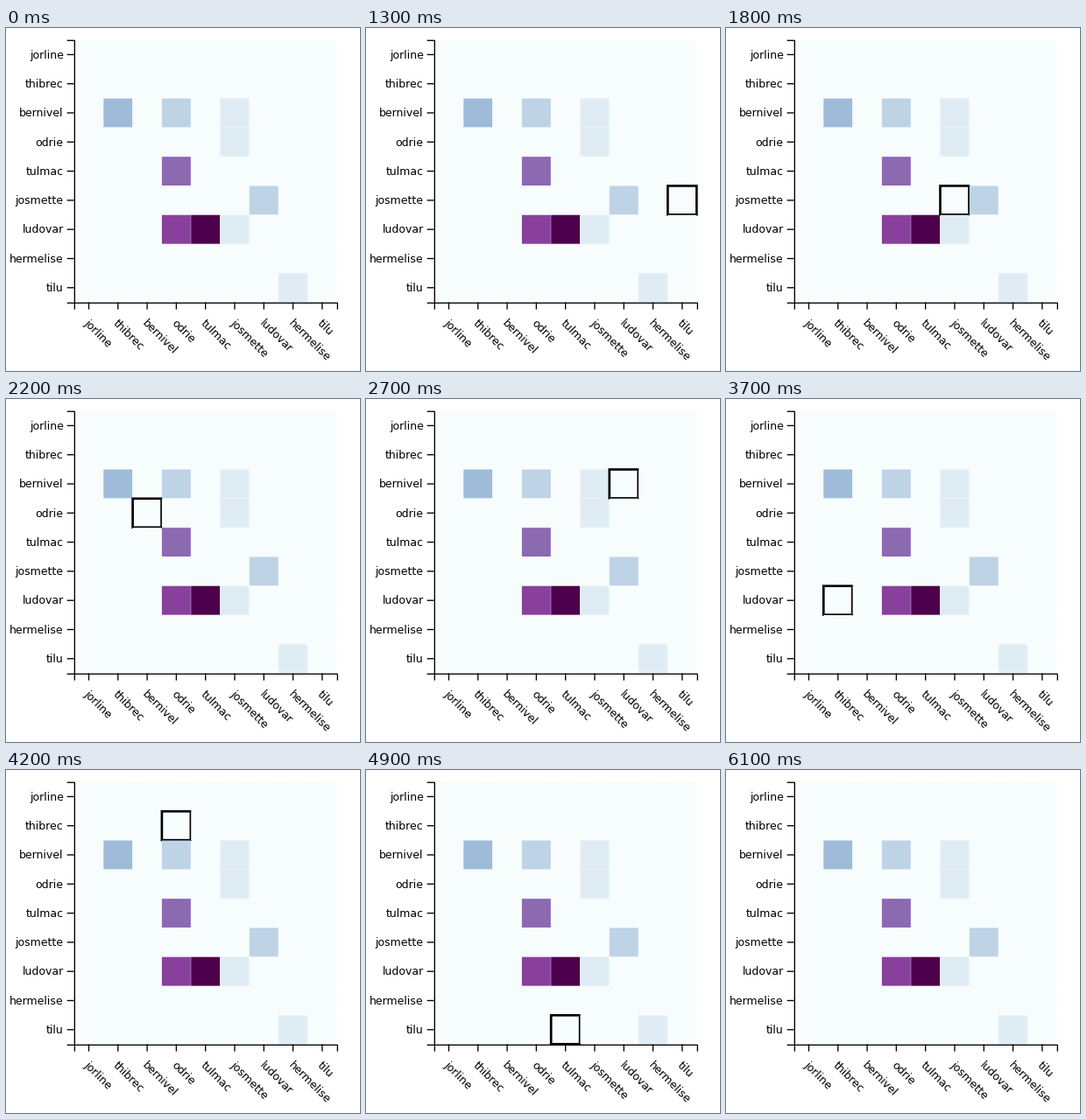
Animation, 404 px wide and 392 px high, one loop 7100 ms. Source, as a matplotlib script:

```python
import matplotlib.pyplot as plt
import numpy as np
from matplotlib.animation import FuncAnimation
from matplotlib.patches import Rectangle

W, H, DPI = 404, 392, 100
PT = 72 / DPI
NAMES = ["jorline", "thibrec", "bernivel", "odrie", "tulmac",
         "josmette", "ludovar", "hermelise", "tilu"]

# Layout in pixels: a band scale with 1 % padding, drawn at 4/3 zoom
ZOOM = 4 / 3
LEFT, TOP, SIZE = 77.67, 13.6, 300
PAD = 0.01
STEP = SIZE / (len(NAMES) + PAD)
BAND = STEP * (1 - PAD)
TICK = 6 * ZOOM
HALF = 0.5 * ZOOM
FONT = 12.5 * PT

# Strength of each (column, row) link, out of 8
LEVELS = {(1, 2): 3, (3, 2): 2, (5, 2): 1, (5, 3): 1, (3, 4): 5,
          (6, 5): 2, (3, 6): 6, (4, 6): 8, (5, 6): 1, (7, 8): 1}
COLORS = plt.get_cmap("BuPu")

# Pointer path: (frame, column, row), straight moves in between
PATH = np.array([
    (13, 8, 5), (15, 8, 5), (16, 7, 6), (21, 2, 4), (22, 2, 3),
    (26, 6, 1), (31, 6, 6), (33, 4, 8), (36, 1, 7), (39, 1, 4),
    (42, 3, 1), (45, 7, 4), (47, 6, 8), (49, 4, 8), (51, 6, 6),
    (52, 6, 6), (53, 8, 5),
])

plt.rcParams["font.family"] = "DejaVu Sans"
fig = plt.figure(figsize=(W / DPI, H / DPI), dpi=DPI, facecolor="white")
ax = fig.add_axes([0, 0, 1, 1])
ax.set_xlim(0, W)
ax.set_ylim(H, 0)
ax.axis("off")


def line(xs, ys):
    ax.plot(xs, ys, color="black", lw=ZOOM * PT, zorder=3, snap=False,
            solid_capstyle="butt", solid_joinstyle="miter")


def band_start(i):
    return STEP * (PAD + i)


def add_cell(col, row):
    level = LEVELS.get((col, row), 0)
    cell = Rectangle((LEFT + band_start(col), TOP + band_start(row)),
                     BAND, BAND, facecolor=COLORS(level / 8),
                     edgecolor="none", linewidth=0, joinstyle="miter",
                     snap=False, zorder=2)
    return ax.add_patch(cell)


# Column by column, so later cells cover the outer stroke of earlier ones
count = len(NAMES)
cells = {(col, row): add_cell(col, row)
         for col in range(count) for row in range(count)}

bottom = TOP + SIZE
x0, x1 = LEFT + HALF, LEFT + SIZE + HALF
y0, y1 = TOP + HALF, bottom + HALF
line([LEFT - TICK, x0, x0, LEFT - TICK], [y0, y0, y1, y1])
line([x0, x0, x1, x1], [bottom + TICK, y1, y1, bottom + TICK])

for i, name in enumerate(NAMES):
    mid = band_start(i) + BAND / 2
    x, y = LEFT + mid, TOP + mid
    line([LEFT - TICK, LEFT], [y, y])
    line([x, x], [bottom, bottom + TICK])
    ax.text(LEFT - 9 * ZOOM, y + 3.2 * ZOOM, name, size=FONT,
            ha="right", va="baseline")
    ax.text(x - 5.75, bottom + 24.6, name, size=FONT, rotation=-45,
            rotation_mode="anchor", ha="left", va="baseline")


def hovered_cell(frame):
    times, cols, rows = PATH.T
    if not times[0] <= frame <= times[-1]:
        return None
    return tuple(int(np.floor(np.interp(frame, times, axis) + 0.5))
                 for axis in (cols, rows))


def update(frame):
    hovered = hovered_cell(frame)
    for key, cell in cells.items():
        active = key == hovered
        cell.set_edgecolor("black" if active else "none")
        cell.set_linewidth(2 * ZOOM * PT if active else 0)
    return list(cells.values())


anim = FuncAnimation(fig, update, frames=71, interval=100,
                     repeat=True, repeat_delay=0, blit=False)
plt.show()
```
